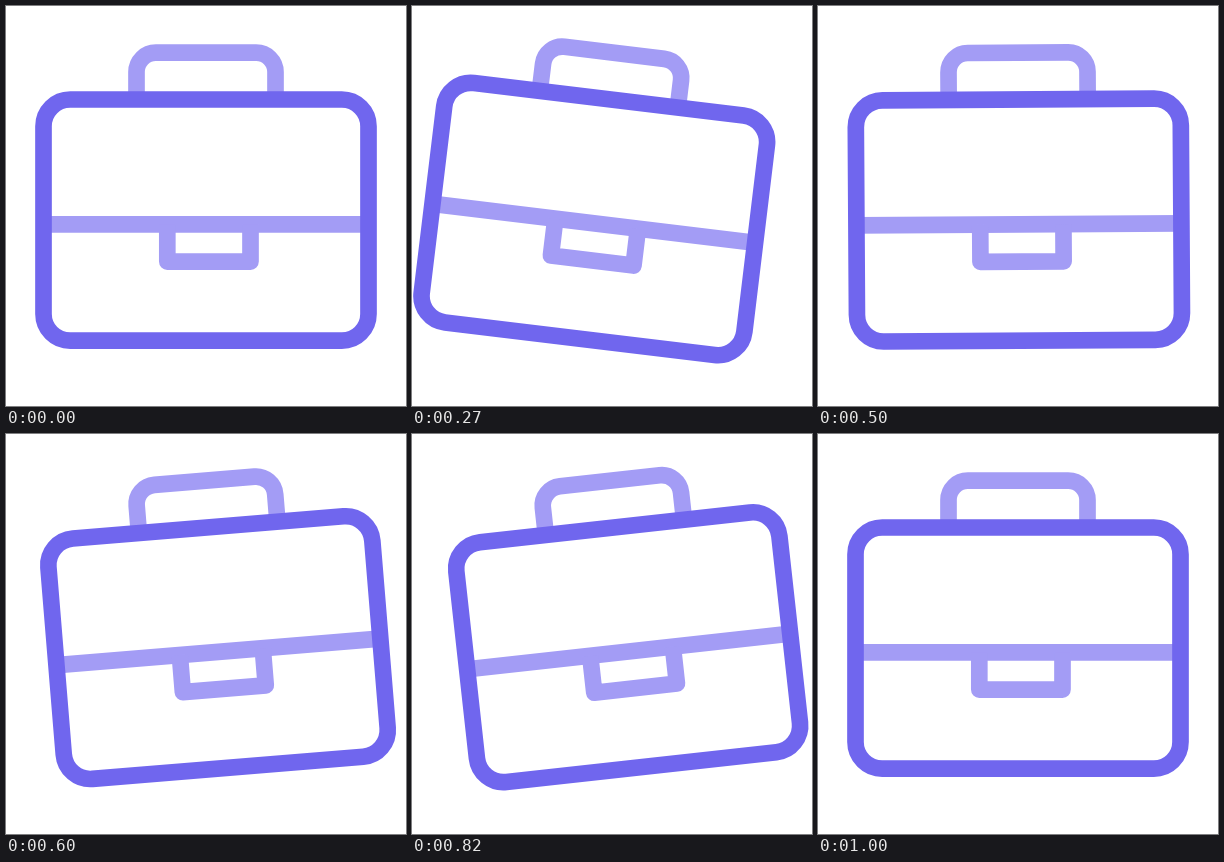
Animation, 400 px wide and 400 px high, one loop 1020 ms. Source, as an HTML page:

```html
<!DOCTYPE html>
<html lang="en">
<head>
<meta charset="utf-8">
<title>Swinging briefcase</title>
<style>
  html, body { margin: 0; width: 100%; height: 100%; overflow: hidden; background: #fff; }
  svg { display: block; width: 100vw; height: 100vh; }
  .light { stroke: #a39cf5; }
  .dark { stroke: #7066ee; }
</style>
</head>
<body>
<svg viewBox="0 0 400 400">
  <g id="bag" fill="none" stroke-width="16.67">
    <path class="light" d="M130.5 93V66a19.3 19.3 0 0 1 19.3-19.3H250.2a19.3 19.3 0 0 1 19.3 19.3V93"/>
    <path class="light" d="M38 218.4H362"/>
    <path class="light" stroke-linejoin="round" d="M161.3 218.4V255.6H244.5V218.4"/>
    <rect class="dark" x="37.5" y="93.5" width="325" height="241.2" rx="26.7"/>
  </g>
</svg>
<script>
  const LOOP = 1020, STEP = 25;
  const SWING = 7;
  // Swing peaks and end, counted in steps
  const RIGHT = 9.75, LEFT = 29.75, END = 40;
  const bag = document.getElementById("bag");

  const easeIn = p => p * p;
  const easeOut = p => 1 - easeIn(1 - p);
  const easeInOut = p => p < 0.5 ? easeIn(2 * p) / 2 : (1 + easeOut(2 * p - 1)) / 2;

  function angleAt(n) {
    if (n < RIGHT) return SWING * easeOut(n / RIGHT);
    if (n < LEFT) return SWING * (1 - 2 * easeInOut((n - RIGHT) / (LEFT - RIGHT)));
    return -SWING * (1 - easeIn((n - LEFT) / (END - LEFT)));
  }

  function draw(now) {
    // Steps start on whole hundredths of a second: 0, 20, 50, 70, 100 ...
    const tick = Math.floor((now % LOOP) / 10) * 10;
    const n = Math.floor((tick + 5) / STEP);
    bag.setAttribute("transform", `rotate(${angleAt(n).toFixed(3)} 200 66.67)`);
  }

  const start = performance.now();
  function loop() {
    draw(performance.now() - start);
    requestAnimationFrame(loop);
  }
  loop();
</script>
</body>
</html>
```
